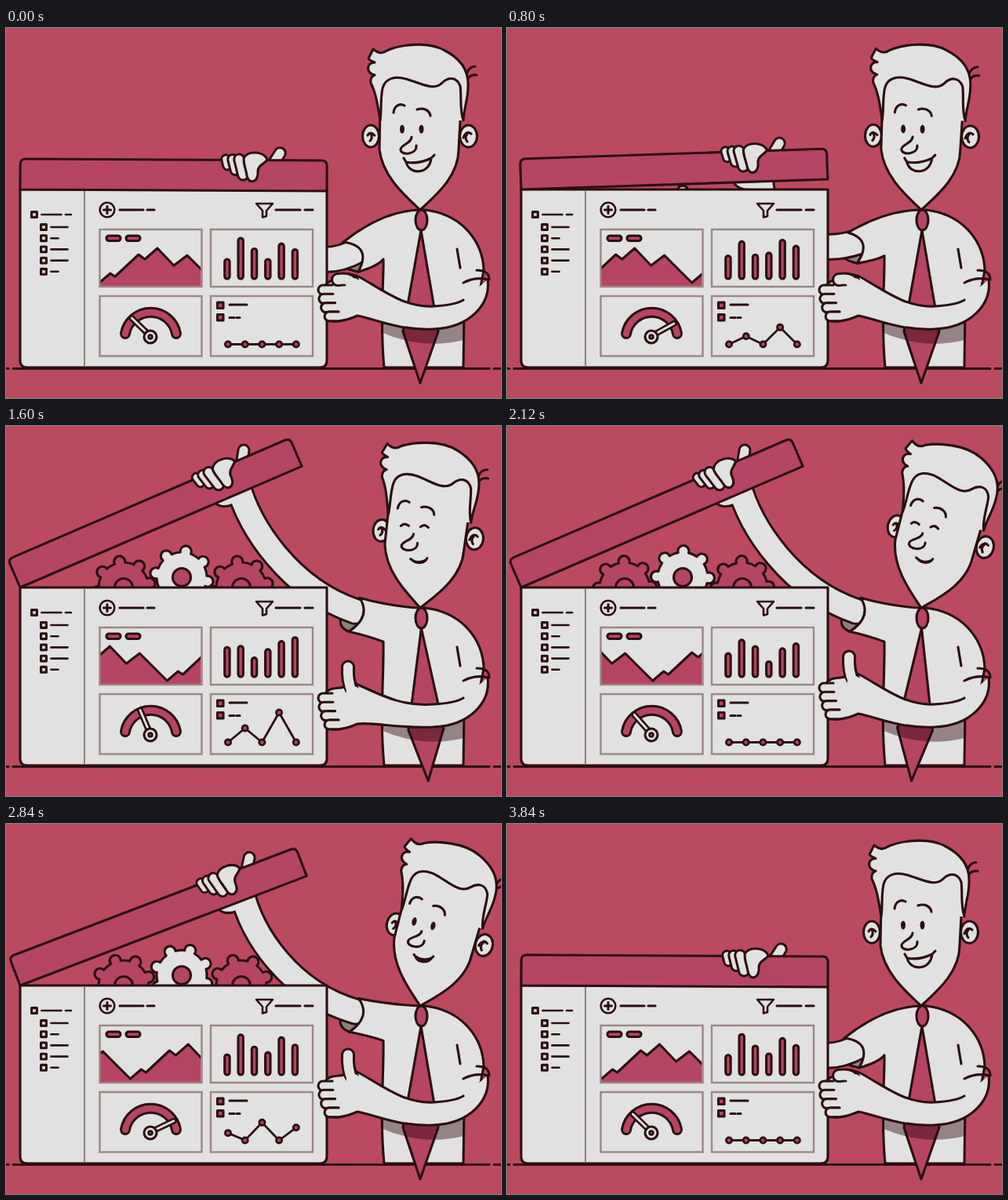
An HTML page that plays this animation: 631x472 px, repeating every 3.88 s.

```html
<!DOCTYPE html>
<html lang="en">
<head>
<meta charset="utf-8">
<title>Opening the dashboard</title>
<style>
  html, body { margin: 0; width: 100%; height: 100%; overflow: hidden; background: #bb4a61; }
  svg { display: block; width: 631px; height: 472px; }
  .k { stroke: #2b0f10; stroke-width: 3.1; stroke-linejoin: round; stroke-linecap: round; }
  .w { fill: #e1e1e1; }
  .r { fill: #b54563; }
  .n { fill: none; }
  .card { fill: none; stroke: #9c8684; stroke-width: 2.4; }
  .cap { fill: none; stroke-linecap: round; stroke-linejoin: round; }
  .dark { stroke: #2b0f10; }
  .light { stroke: #e1e1e1; }
</style>
</head>
<body>
<svg viewBox="0 0 631 472">
  <rect width="631" height="472" fill="#bb4a61"/>
  <path class="k n" d="M0 434.5H3M9 434.5H616M622 434.5H631"/>

  <g id="gears"></g>

  <path id="opening" class="k" fill="#8f8081"/>
  <path id="armEdge" class="cap dark" stroke-width="35"/>
  <g id="lidBack">
    <ellipse class="k w" cx="309" cy="203" rx="20" ry="13"/>
    <path class="cap dark" stroke-width="17" d="M335 180L349 158"/>
    <path class="cap light" stroke-width="11" d="M335 180L349 158"/>
  </g>
  <path id="armFill" class="cap light" stroke-width="29"/>

  <path class="k w" d="M18 206H409V424Q409 433 400 433H27Q18 433 18 424Z"/>
  <path class="n" stroke="#8f8080" stroke-width="2" d="M100 208V432"/>
  <g id="side" class="k n"></g>
  <g class="k n">
    <circle cx="129" cy="232" r="9.3" stroke-width="2.6"/>
    <path d="M124.5 232H133.5M129 227.5V236.5M145 232H175M180 232H189M344 232H375M381 232H391"/>
    <path stroke-width="2.6" d="M319 224H340L332 233V240L327 241.5V233Z"/>
  </g>

  <clipPath id="areaClip"><rect x="120" y="258" width="128.5" height="71"/></clipPath>
  <g clip-path="url(#areaClip)"><path id="area" class="k r"/></g>
  <g class="k r">
    <rect x="128" y="265" width="18" height="6.5" rx="3.2"/>
    <rect x="153" y="265" width="18" height="6.5" rx="3.2"/>
    <g id="bars"></g>
    <rect x="269.5" y="350" width="7.5" height="7.5"/>
    <rect x="269.5" y="365.5" width="7.5" height="7.5"/>
    <path d="M285 353H307M285 369.5H291M294 369.5H298"/>
    <path id="trend" fill="none" stroke-width="2.8"/>
    <g id="dots"></g>
  </g>
  <path class="cap dark" stroke-width="14" d="M152 390A33 33 0 0 1 217 390"/>
  <path class="cap" stroke="#b54563" stroke-width="8" d="M152 390A33 33 0 0 1 217 390"/>
  <g id="needle">
    <path class="cap dark" stroke-width="8" d="M184 393V360"/>
    <path class="cap light" stroke-width="2.8" d="M184 393V360"/>
  </g>
  <circle class="k w" cx="184" cy="394" r="8"/>
  <circle class="k w" cx="184" cy="394" r="2.2"/>
  <rect class="card" x="119.5" y="257" width="130" height="73"/>
  <rect class="card" x="261" y="257" width="130" height="73"/>
  <rect class="card" x="119.5" y="342" width="130" height="76.5"/>
  <rect class="card" x="261" y="342" width="130" height="76.5"/>

  <g id="lid">
    <path class="k r" d="M18 206V174Q18 167 25 167H402Q409 167 409 174V206Z"/>
    <g id="grip"></g>
    <path class="k w" d="M303 164C309 154 328 156 333 166C330 172 322 172 321 180C322 197 309 198 307 187C306 179 302 172 303 164Z"/>
  </g>

  <path id="torso" class="k w"/>
  <g id="tie"><path class="k r" d="M529 258L551 387L528 453L506 387Z"/></g>
  <path fill="#2b000a" fill-opacity=".42" d="M479 360H584V398Q530 411 478 388Z"/>
  <path class="k n" d="M575 282L579 306"/>
  <g id="head">
    <path class="k n" d="M584 73C585 58 590 49 598 49M586 71C588 63 593 59 600 60" stroke-width="2.6"/>
    <g class="k w">
      <g id="ear">
        <ellipse cx="465" cy="138" rx="10.5" ry="14"/>
        <path class="n" d="M461 137Q464 131 470 137M465 135Q468 140 464 144"/>
      </g>
      <ellipse cx="589.5" cy="138" rx="11" ry="14"/>
      <path class="n" d="M593 135Q587 130 583 140M588 135Q584 140 588 145"/>
      <path d="M477 100L476 155C480 190 510 215 528 232C546 215 577 190 577 155L580 100"/>
      <path d="M477 118C474 100 472 84 465 70Q464 62 470 60Q460 57 462 49Q464 44 470 44Q460 40 463 37L468 27C474 32 480 33 485 29C500 22 536 16 558 28C580 39 590 54 589 74C589 92 584 100 583 118Z" stroke="none"/>
      <path class="n" d="M477 118C474 100 472 84 465 70Q464 62 470 60Q460 57 462 49Q464 44 470 44Q460 40 463 37L468 27C474 32 480 33 485 29C500 22 536 16 558 28C580 39 590 54 589 74C589 92 584 100 583 118C578 104 581 88 579 74C574 61 563 63 556 70C545 81 528 70 510 65C496 61 483 64 480 77C477 91 479 104 477 118Z"/>
    </g>
    <g id="face">
      <path class="k n" d="M494 108C495 98 503 96 508 99M524 104C532 101 540 105 541 112"/>
      <g id="openEyes" fill="#2b0f10">
        <ellipse cx="505" cy="129" rx="3" ry="5.5"/>
        <ellipse cx="529.5" cy="129" rx="3" ry="5.5"/>
      </g>
      <path id="shutEyes" class="k n" d="M500 130Q504 125 510 129M525 129Q530 124 535 129"/>
      <path class="k w" d="M517 139C517 147 503 149 503 155C503 163 524 162 523 150"/>
      <path id="mouth" class="k w"/>
    </g>
  </g>
  <ellipse class="k r" cx="529.5" cy="245" rx="7.5" ry="13"/>

  <path id="forearm" class="k w"/>
  <path class="k n" d="M600 309C609 309 616 312 616 321M583 325Q598 317 615 321"/>
  <g id="hand">
    <path id="thumbEdge" class="cap dark" stroke-width="18"/>
    <path id="thumbFill" class="cap light" stroke-width="12"/>
    <circle class="w" cx="443" cy="329" r="10"/>
    <g id="fingers" class="k w"></g>
  </g>
</svg>
<script>
const LOOP = 3880, STEP = 40, NS = 'http://www.w3.org/2000/svg';
const $ = id => document.getElementById(id);
const set = (id, attrs) => {
  const node = typeof id === 'string' ? $(id) : id;
  for (const k in attrs) node.setAttribute(k, attrs[k]);
};
function add(parent, tag, attrs) {
  const node = document.createElementNS(NS, tag);
  set(node, attrs);
  return $(parent).appendChild(node);
}
const times = (n, fn) => Array.from({ length: n }, (_, i) => fn(i));
const mix = (a, b, p) => a + (b - a) * p;
const part = (t, from, to) => Math.max(0, Math.min(1, (t - from) / (to - from)));
const ramp = (t, from, to) => { const p = part(t, from, to); return p * p * (3 - 2 * p); };
const hump = (t, from, to) => Math.sin(Math.PI * part(t, from, to)) ** 2;

// Swings open past its rest, settles, sinks a little, then falls shut.
const lidAngle = t => -27.5 * ramp(t, 720, 1180) + 3.9 * ramp(t, 1180, 1500)
  + 5.6 * ramp(t, 2300, 3500) + 18 * ramp(t, 3370, 3740) + .3;
const gearDrop = t => 62 * (1 - ramp(t, 680, 1080) + ramp(t, 3000, 3800));
const headAngle = t => 5 * ramp(t, 600, 1500) + 8.2 * ramp(t, 1620, 2060) - 13.2 * ramp(t, 2900, 3800);
const tieAngle = t => -3.5 * Math.sin(2 * Math.PI * part(t, 1150, 2450));
const smile = t => 1 - ramp(t, 1050, 1300) + ramp(t, 2650, 3300);
const handDrop = t => 13 * hump(t, 1150, 2050) - 10 * hump(t, 2920, 3800);
const thumbUp = t => ramp(t, 950, 1250) - ramp(t, 3400, 3680);

function gearPath() {
  const at = deg => {
    const a = deg * Math.PI / 180;
    return `${32 * Math.sin(a)} ${-32 * Math.cos(a)}`;
  };
  return 'M' + at(-12) + times(8, i => `A7 7 0 1 1 ${at(45 * i + 12)}A32 32 0 0 1 ${at(45 * i + 33)}`).join('') + 'Z';
}
function gear(x, y, fill, dir) {
  const body = add('gears', 'path', { class: 'k ' + fill, d: gearPath() });
  const hole = add('gears', 'circle', { class: 'k r', cx: x, r: 11.5 });
  return { x, y, dir, body, hole };
}
const gears = [gear(150, 206, 'r', -1), gear(300, 206, 'r', -1), gear(224, 193, 'w', 1)];

function sideRow(x, y, length) {
  add('side', 'rect', { x: x - 3.4, y: y - 3.4, width: 6.8, height: 6.8 });
  add('side', 'path', { d: `M${x + 9.5} ${y}h${length}`, 'stroke-width': 2.6 });
}
sideRow(36, 238, 25);
add('side', 'path', { d: 'M76 238H83', 'stroke-width': 2.6 });
times(5, i => sideRow(48, 254 + 14.2 * i, i % 3 === 1 ? 9 : 21));
add('lid', 'g', {});

// Each bar bobs around its own mean height, out of step with the others.
const means = [285.5, 274.5, 286.5, 291, 277, 273], phases = [0, .5, .6, .2, .32, 0];
const bars = times(6, i => add('bars', 'rect', { x: 278.7 + i * 17.3, width: 6.4, rx: 3.2 }));
const dotX = i => 283 + 21.7 * i;
const dots = times(5, i => add('dots', 'circle', { cx: dotX(i), r: 3.6, 'stroke-width': 2.8 }));
const lifts = [14.5, 18, 35, 38, 25];

const HILL = 147;
const hill = 'l14 -12l6 4l30 -28l8 6l16 -14l21 22l17 -13l35 35';
set('area', { d: 'M0 325' + hill.repeat(3) + 'V340H0Z' });

times(4, i => {
  const x = 408 + i * i * .9, y = 334 + 11.3 * i;
  add('fingers', 'path', { d: `M${x + 8} ${y - 6}H${x - 4}a6 6 0 0 0 0 12H${x + 6}` });
});
times(3, i => {
  const d = `M${280 + 8.5 * i} 166l${2 + 1.5 * i} ${8 + 6 * i}`;
  add('grip', 'path', { class: 'cap dark', 'stroke-width': 14 + i, d });
  add('grip', 'path', { class: 'cap light', 'stroke-width': 8 + i, d });
});

function drawCharts(t) {
  set('area', { transform: `translate(${119 - HILL * (1 + t / LOOP)} 0)` });

  bars.forEach((bar, i) => {
    const y = means[i] + 8 * Math.cos(2 * Math.PI * (t / 970 - phases[i])) + 1.5;
    set(bar, { y, height: 320 - y });
  });

  const half = t % 1940, p = 1 - Math.abs(1 - half / 970);
  const ease = p < .5 ? 2.83 * p ** 2.5 : 1 - 2.83 * (1 - p) ** 2.5;
  set('needle', { transform: `rotate(${mix(-46, 65, ease)} 184 393)` });

  // Even points rise in one half of the loop, odd points in the other.
  const grow = (1 - (1 - part(half, 190, 1610)) ** 1.5) * (1 - ramp(half, 1620, 1880));
  const odd = t < 1940 ? 1 : 0;
  const ys = lifts.map((lift, i) => 403.5 - (i % 2 === odd ? lift * grow : 0));
  set('trend', { d: 'M' + ys.map((y, i) => dotX(i) + ' ' + y).join('L') });
  dots.forEach((dot, i) => set(dot, { cy: ys[i] }));
}

function drawLid(t) {
  const angle = lidAngle(t), turn = `rotate(${angle} 18 206)`;
  set('lid', { transform: turn });
  set('lidBack', { transform: turn });
  const a = angle * Math.PI / 180, c = Math.cos(a), s = Math.sin(a);
  const onLid = (x, y) => `${18 + (x - 18) * c - (y - 206) * s} ${206 + (x - 18) * s + (y - 206) * c}`;

  // The elbow leads the lid a little.
  const lift = Math.max(0, -angle / 23.5) ** .6, v = (shut, open) => mix(shut, open, lift);
  const ax = v(430, 451), ay = v(273, 219), bx = v(449, 437), by = v(311, 262), pit = v(295, 275);
  const arm = `M${onLid(325, 192)}C${onLid(316, 252)} ${v(375, 362)} ${v(325, 207)} ${v(450, 445)} ${v(283, 236)}`;
  set('armEdge', { d: arm });
  set('armFill', { d: arm });
  const rim = `Q${v(467, 466)} ${v(278, 243)} ${bx} ${by}`;
  set('opening', { d: `M${ax} ${ay}${rim}Q${(ax + bx) / 2 - 34} ${(ay + by) / 2 + 10} ${ax} ${ay}Z` });
  set('torso', { d: `M526 232Q${v(479, 490)} ${v(234, 230)} ${ax} ${ay}${rim}Q${bx + 25} ${mix(by, pit, .45)} 481 ${pit}`
    + 'C482 320 476 370 482 433H583L584 365L605 330L609 309C608 275 584 238 534 232Z' });

  const drop = gearDrop(t), spin = 9 - .101 * (t - 1600);
  for (const g of gears) {
    set(g.body, { transform: `translate(${g.x} ${g.y + drop}) rotate(${g.dir * spin})` });
    set(g.hole, { cy: g.y + drop });
  }
}

function drawMan(t) {
  const tilt = headAngle(t), turn = 1 - Math.exp(-tilt / 6);
  set('head', { transform: `rotate(${tilt} 528 232)` });
  set('face', { transform: `translate(${-10 * turn} 0)` });
  set('ear', { transform: `translate(${9 * turn} 0)` });
  set('tie', { transform: `rotate(${tieAngle(t)} 529 250)` });
  const shut = t >= 1180 && t < 2500;
  set('openEyes', { visibility: shut ? 'hidden' : 'visible' });
  set('shutEyes', { visibility: shut ? 'visible' : 'hidden' });

  const m = smile(t), v = (a, b) => mix(a, b, m);
  const left = `${v(518, 510)} ${v(172, 171)}`, right = `${v(536, 542)} ${v(170, 166)}`;
  set('mouth', { d: `M${v(516, 507)} ${v(171, 166)}L${left}`
    + `C${v(522, 514)} ${v(176, 188)} ${v(532, 540)} ${v(176, 187)} ${right}L${v(537, 546)} ${v(168, 162)}L${right}`
    + `C${v(531, 532)} ${v(175, 171)} ${v(522, 520)} ${v(175, 173)} ${left}` });

  const h = handDrop(t), up = thumbUp(t);
  set('hand', { transform: `translate(0 ${h})` });
  set('forearm', { d: `M614 321C618 352 592 382 545 384C500 386 470 ${371 + h * .5} 448 ${367 + h}`
    + `C432 ${374 + h} 414 ${377 + h} 412 ${371 + h}L407 ${329 + h}C411 ${319 + h} 425 ${323 + h} 433 ${319 + h}`
    + `Q441 ${312 + h} 451 ${318 + h}C480 ${334 + h * .8} 508 ${357 + h * .1} 545 355C562 354 575 352 583 347` });
  const tip = `Q${mix(438, 435, up)} ${mix(319, 312, up)} ${mix(423, 436, up)} ${mix(321, 294.5, up)}`;
  set('thumbEdge', { d: 'M441 323' + tip });
  set('thumbFill', { d: 'M441 326' + tip });
}

function tick() {
  const t = Math.floor((performance.now() % LOOP) / STEP) * STEP;
  drawCharts(t);
  drawLid(t);
  drawMan(t);
  requestAnimationFrame(tick);
}
tick();
</script>
</body>
</html>
```
